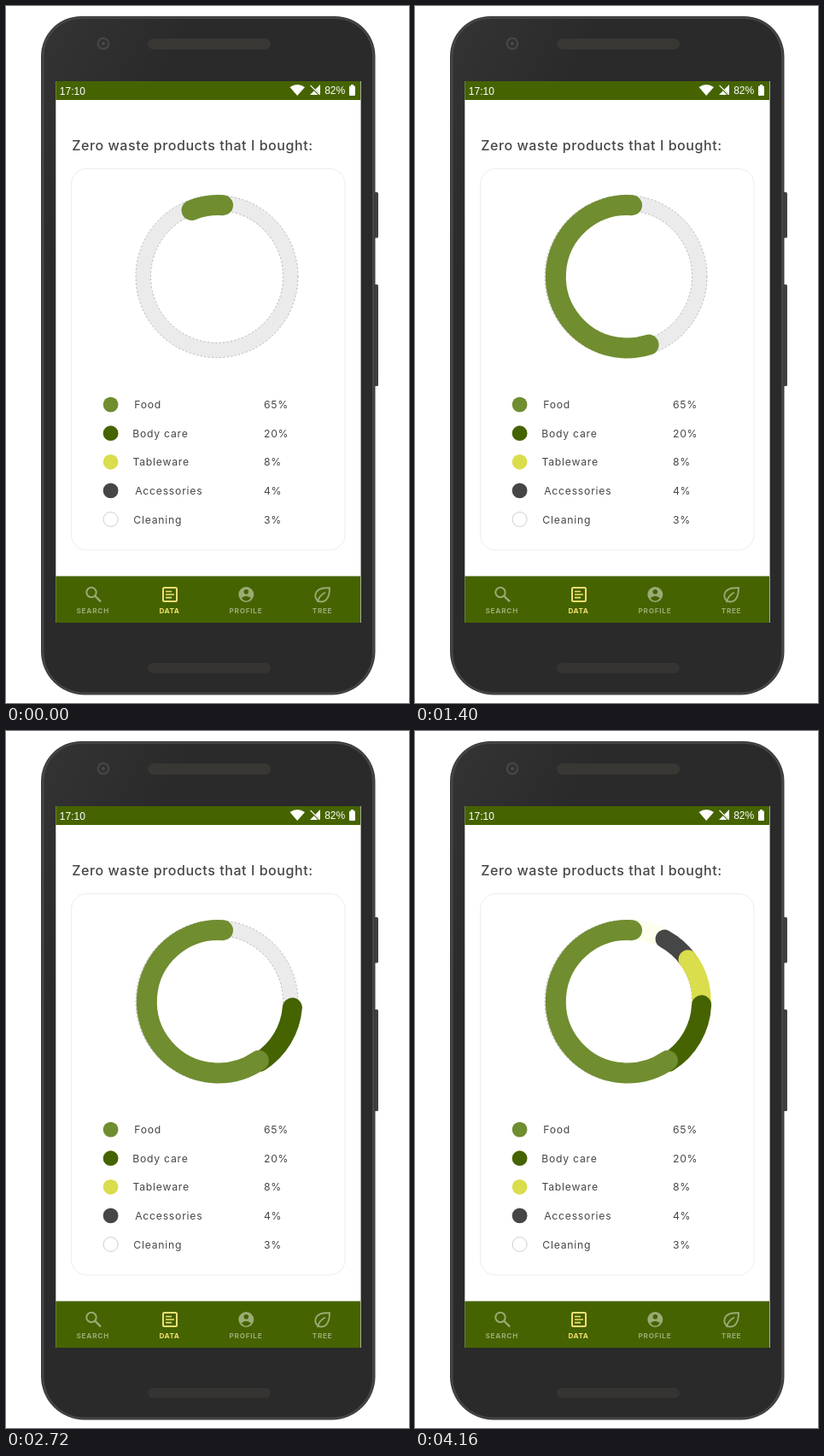
An HTML page with a canvas that plays this animation: 472 px wide and 816 px high, repeating every 4240 ms.

```html
<!DOCTYPE html>
<html lang="en">
<head>
<meta charset="utf-8">
<title>Zero waste chart</title>
<style>
html, body { margin: 0; width: 100%; height: 100%; overflow: hidden; background: #fff; }
canvas { display: block; }
</style>
</head>
<body>
<canvas id="stage" width="472" height="816"></canvas>
<script>
const ctx = document.getElementById('stage').getContext('2d');
const LOOP = 4240;
const BAR = '#456300', DIM = '#9aab74', ACTIVE = '#f3df70', INK = '#464646';
const UI = 'Inter, "Open Sans", sans-serif';
const RADIUS = 83.7;

// Angles run counter-clockwise from the top; keys are [ms, degrees].
const segments = [
  { color: '#fdfeec', width: 23, x: 252, from: 331, keys: [[4020, 331], [4140, 357]] },
  { color: '#464646', width: 21.5, x: 252, from: 306, keys: [[3440, 306.2], [3520, 313.1], [3640, 320], [3800, 327], [4020, 331.3]] },
  { color: '#dadd4c', width: 22, x: 252, from: 267, keys: [[2880, 267], [3060, 285], [3220, 298], [3420, 306.2]] },
  { color: BAR, width: 23, x: 252, from: 212.6, keys: [[1760, 212.6], [2000, 235.9], [2200, 249], [2440, 259], [2720, 265.2], [2880, 267.3]] },
  { color: '#708d30', width: 24, x: 248.5, from: -3.8, keys: [[0, 21.7], [560, 97.2], [960, 148.3], [1300, 188], [1480, 205], [1660, 214.5]] }
];

const legend = [
  ['Food', '65%', 150.2, '#708d30'],
  ['Body care', '20%', 148.2, BAR],
  ['Tableware', '8%', 148.5, '#dadd4c'],
  ['Accessories', '4%', 151.2, '#464646'],
  ['Cleaning', '3%', 149.3, '#fff']
];

function box(x, y, w, h, r, fill) {
  ctx.beginPath();
  ctx.roundRect(x, y, w, h, r);
  ctx.fillStyle = fill;
  ctx.fill();
}

function disc(x, y, r, fill) {
  ctx.beginPath();
  ctx.arc(x, y, r, 0, 7);
  ctx.fillStyle = fill;
  ctx.fill();
}

function text(str, x, y, font, color, spacing = 0) {
  ctx.font = font;
  ctx.letterSpacing = spacing + 'px';
  ctx.fillStyle = color;
  ctx.fillText(str, x, y);
}

function line(d, color, width) {
  ctx.strokeStyle = color;
  ctx.lineWidth = width;
  ctx.stroke(new Path2D(d));
}

function shape(d, color) {
  ctx.fillStyle = color;
  ctx.fill(new Path2D(d));
}

function drawPhone() {
  box(430, 218, 6, 53.5, 1.5, '#404040');
  box(430, 326, 6, 119, 1.5, '#404040');
  box(41, 12, 391.5, 794.5, [47, 47, 51, 51], '#363636');
  box(42, 13, 389.5, 792.5, [46, 46, 50, 50], '#464646');
  const shade = ctx.createLinearGradient(44, 15, 180, 90);
  shade.addColorStop(0, '#343434');
  shade.addColorStop(1, '#2a2a2a');
  box(44.5, 15, 384.5, 788.5, [43, 43, 47, 47], shade);
  disc(114, 44, 7.5, '#454545');
  disc(114, 44, 5, '#303030');
  disc(114, 44, 2, '#4b4b4b');
  box(166, 38, 144, 13, 6.5, '#393734');
  box(166, 769, 144, 12, 6, '#363432');
  box(58.3, 88, 357, 634, 0, '#fff');
  box(415, 88, 1, 634, 0, '#a8aca0');
}

function drawStatus() {
  box(58.3, 88, 356.7, 22, 0, BAR);
  const font = '12px "Liberation Sans", Arial, sans-serif';
  text('17:10', 62.8, 104, font, '#fff');
  text('82%', 373.2, 103, font, '#fff');
  shape('M332.5 95 Q341.2 89 350 95 L341.2 105 Z', '#fff');
  shape('M368 92 V104 H356 Z', '#fff');
  line('M356.5 93.5 L367.5 104.5', BAR, 2.4);
  line('M356.5 92.8 L367.5 103.8', '#fff', 1.2);
  box(402, 93.5, 7, 11.5, 1, '#fff');
  box(404, 92, 3, 2, 0, '#fff');
}

function drawTabs() {
  box(58.3, 667.5, 356.7, 54.5, 0, BAR);
  const font = '700 8.2px ' + UI;
  text('SEARCH', 82.5, 711, font, DIM, 0.75);
  text('DATA', 179.5, 711, font, ACTIVE, 0.55);
  text('PROFILE', 261.5, 711, font, DIM, 0.75);
  text('TREE', 358.8, 711, font, DIM, 0.65);

  ctx.beginPath();
  ctx.arc(100, 686.5, 5.7, 0, 7);
  ctx.strokeStyle = DIM;
  ctx.lineWidth = 2;
  ctx.stroke();
  line('M104.2 690.7 L111 697.3', DIM, 2.3);

  ctx.beginPath();
  ctx.roundRect(184, 681, 16, 16, 1.5);
  ctx.strokeStyle = ACTIVE;
  ctx.lineWidth = 2;
  ctx.stroke();
  line('M187 685.5 H194 M187 689 H197 M187 692.7 H194', ACTIVE, 1.7);

  disc(281.3, 689, 9, DIM);
  disc(281.3, 685.8, 2.8, BAR);
  shape('M275.6 693.2 Q281.3 688.2 287 693.2 Q281.3 699.6 275.6 693.2 Z', BAR);

  line('M379 681.3 C372 681 366 682 363.6 686 C361.5 689.7 362 693 364.5 695.7 C367.5 698.3 372 698 375 695.2 C378.3 692 379 687 379 681.3 Z', DIM, 1.9);
  line('M365 698 C366 692.5 369.5 688.8 374 686.5', DIM, 1.9);
}

function drawCard() {
  text('Zero waste products that I bought:', 77.3, 169, '500 16px ' + UI, INK, 0.56);
  ctx.beginPath();
  ctx.roundRect(76.5, 190.5, 320.5, 446.5, 18);
  ctx.strokeStyle = '#ededed';
  ctx.lineWidth = 1;
  ctx.stroke();
  const font = '12.2px ' + UI;
  legend.forEach(([name, share, x, color], i) => {
    const y = 466.6 + i * 33.6;
    disc(122.6, y, 8.9, color);
    if (color === '#fff') {
      ctx.beginPath();
      ctx.arc(122.6, y, 8.5, 0, 7);
      ctx.strokeStyle = '#cfcfcf';
      ctx.lineWidth = 1;
      ctx.stroke();
    }
    text(name, x, y + 4.5, font, INK, 0.76);
    text(share, 302, y + 4.5, font, INK, 0.7);
  });
}

function drawTrack() {
  ctx.beginPath();
  ctx.arc(247, 316.7, 86.3, 0, 7);
  ctx.strokeStyle = '#ebebeb';
  ctx.lineWidth = 17.6;
  ctx.stroke();
  ctx.setLineDash([2, 2.5]);
  ctx.strokeStyle = 'rgba(70,70,70,.5)';
  ctx.lineWidth = 0.7;
  for (const r of [77.5, 95]) {
    ctx.beginPath();
    ctx.arc(247, 316.7, r, 0, 7);
    ctx.stroke();
  }
  ctx.setLineDash([]);
}

function valueAt(keys, t) {
  let [t0, v0] = keys[0];
  for (const [t1, v1] of keys) {
    if (t < t1) return v0 + (v1 - v0) * (t - t0) / (t1 - t0);
    t0 = t1;
    v0 = v1;
  }
  return v0;
}

const toRad = deg => (-90 - deg) * Math.PI / 180;

function drawSegment(seg, t) {
  if (t < seg.keys[0][0]) return;
  ctx.beginPath();
  ctx.arc(seg.x, 316.8, RADIUS, toRad(seg.from), toRad(valueAt(seg.keys, t)), true);
  ctx.lineCap = 'round';
  ctx.strokeStyle = seg.color;
  ctx.lineWidth = seg.width;
  ctx.stroke();
  ctx.lineCap = 'butt';
}

function draw(t) {
  ctx.fillStyle = '#fff';
  ctx.fillRect(0, 0, 472, 816);
  drawPhone();
  drawStatus();
  drawCard();
  drawTrack();
  segments.forEach(seg => drawSegment(seg, t));
  drawTabs();
}

let start = null;
function tick(now) {
  if (start === null) start = now;
  draw((now - start) % LOOP);
  requestAnimationFrame(tick);
}
draw(0);
requestAnimationFrame(tick);
</script>
</body>
</html>
```
